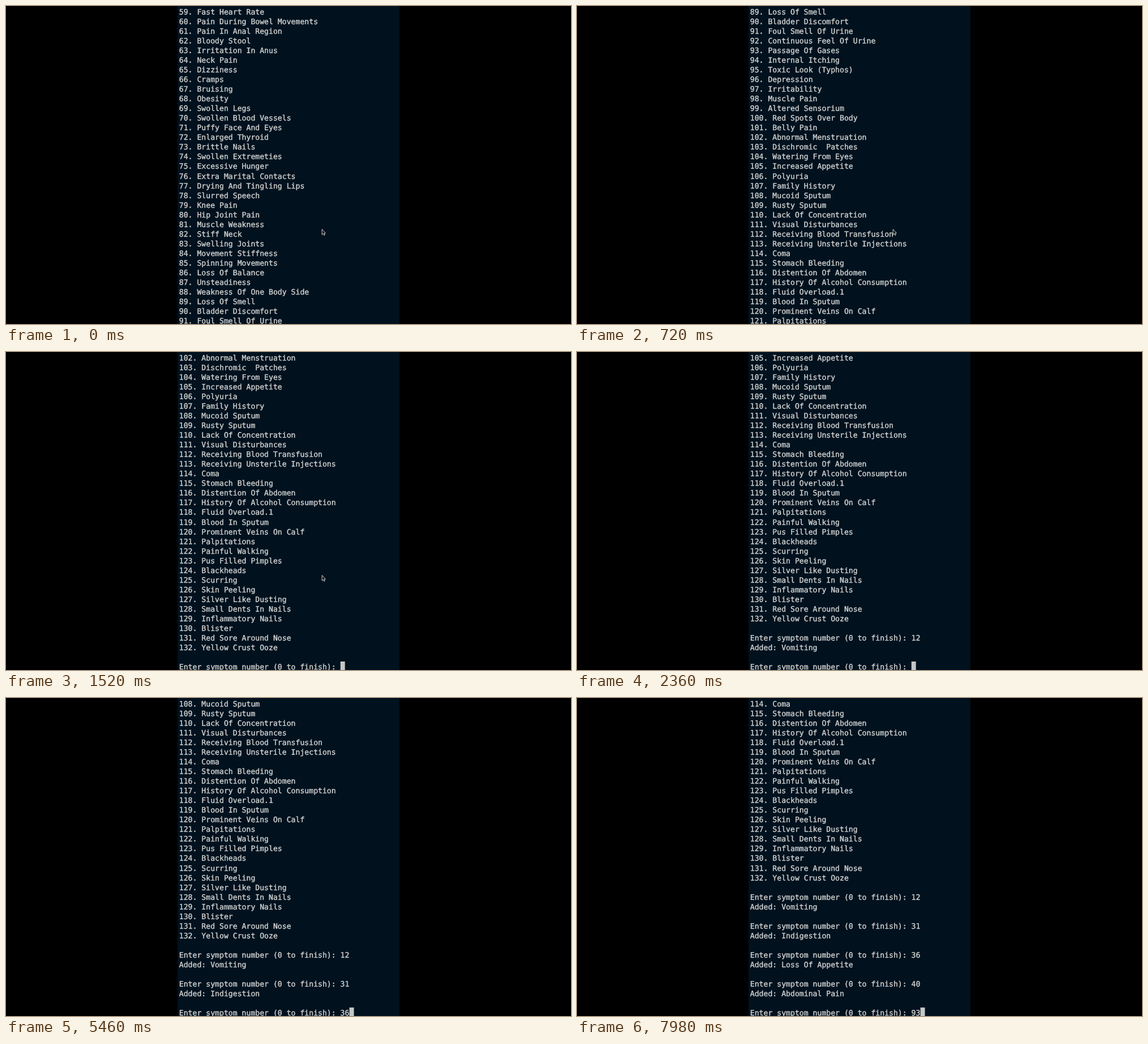
An HTML page that plays this animation: 998 px wide and 561 px high, repeating every 8000 ms.

```html
<!DOCTYPE html>
<html lang="en">
<head>
<meta charset="utf-8">
<title>Symptom checker terminal</title>
<style>
  html, body { margin: 0; width: 100%; height: 100%; overflow: hidden; background: #000; }
  svg { display: block; width: 100vw; height: 100vh; }
  text {
    font: 13.15px "DejaVu Sans Mono", "Liberation Mono", monospace;
    fill: #cfd1d0;
    stroke: #cfd1d0;
    stroke-width: .4px;
    white-space: pre;
    text-rendering: geometricPrecision;
  }
</style>
</head>
<body>
<svg viewBox="0 0 998 561">
  <rect width="998" height="561" fill="#000"/>
  <rect x="303" width="392" height="561" fill="#01111e"/>
  <g id="rows"></g>
  <rect id="caret" y="546" width="8" height="15" fill="#c4c6c6"/>
  <path id="mouse" d="M558.2 393.8v9.6l2.1-1.9 1.5 3.1 1.4-.7-1.4-3h2.6z"
    fill="#05090d" stroke="#d0d0d0" stroke-width="1" stroke-linejoin="round"/>
</svg>
<script>
const LOOP = 8000, ROWS = 33, PITCH = 17.03, LEFT = 306, CHAR = 7.917;
const FIRST = 59, LIST_END = 43;
const PROMPT = "Enter symptom number (0 to finish): ";

const symptoms = `Fast Heart Rate
Pain During Bowel Movements
Pain In Anal Region
Bloody Stool
Irritation In Anus
Neck Pain
Dizziness
Cramps
Bruising
Obesity
Swollen Legs
Swollen Blood Vessels
Puffy Face And Eyes
Enlarged Thyroid
Brittle Nails
Swollen Extremeties
Excessive Hunger
Extra Marital Contacts
Drying And Tingling Lips
Slurred Speech
Knee Pain
Hip Joint Pain
Muscle Weakness
Stiff Neck
Swelling Joints
Movement Stiffness
Spinning Movements
Loss Of Balance
Unsteadiness
Weakness Of One Body Side
Loss Of Smell
Bladder Discomfort
Foul Smell Of Urine
Continuous Feel Of Urine
Passage Of Gases
Internal Itching
Toxic Look (Typhos)
Depression
Irritability
Muscle Pain
Altered Sensorium
Red Spots Over Body
Belly Pain
Abnormal Menstruation
Dischromic  Patches
Watering From Eyes
Increased Appetite
Polyuria
Family History
Mucoid Sputum
Rusty Sputum
Lack Of Concentration
Visual Disturbances
Receiving Blood Transfusion
Receiving Unsterile Injections
Coma
Stomach Bleeding
Distention Of Abdomen
History Of Alcohol Consumption
Fluid Overload.1
Blood In Sputum
Prominent Veins On Calf
Palpitations
Painful Walking
Pus Filled Pimples
Blackheads
Scurring
Skin Peeling
Silver Like Dusting
Small Dents In Nails
Inflammatory Nails
Blister
Red Sore Around Nose
Yellow Crust Ooze`.split("\n").map((name, i) => `${FIRST + i}. ${name}`);

// Times of the first digit, the second digit and the Enter key
const entries = [
  { num: "12", name: "Vomiting", keys: [1780, 1960, 2200] },
  { num: "31", name: "Indigestion", keys: [2800, 3000, 3520] },
  { num: "36", name: "Loss Of Appetite", keys: [4480, 4680, 5580] },
  { num: "40", name: "Abdominal Pain", keys: [6120, 6320, 6980] },
  { num: "93", name: "Passage Of Gases", keys: [7620, 7800, Infinity] }
];

const $ = id => document.getElementById(id);
const rows = Array.from({ length: ROWS }, (_, i) => {
  const el = document.createElementNS("http://www.w3.org/2000/svg", "text");
  el.setAttribute("x", LEFT - 0.2);
  el.setAttribute("y", 15 + i * PITCH);
  return $("rows").appendChild(el);
});

// Trackpad scroll that slows down, with one short hold, until the list ends
function scrolled(t) {
  if (t > 720 && t < 820) t = 720;
  return Math.min(LIST_END, Math.round(70 * (1 - Math.exp(-t / 1286))));
}

function session(t) {
  const lines = [...symptoms, ""];
  let typed = "";
  for (const { num, name, keys } of entries) {
    typed = num.slice(0, keys.slice(0, 2).filter(k => t >= k).length);
    lines.push(PROMPT + typed);
    if (t < keys[2]) break;
    lines.push("Added: " + name, "");
  }
  return { lines, typed };
}

function draw(t) {
  const { lines, typed } = session(t);
  const top = scrolled(t);
  const atEnd = top === LIST_END;
  const start = atEnd ? lines.length - ROWS : top;
  rows.forEach((el, i) => {
    const line = lines[start + i] || "";
    if (el.textContent !== line) el.textContent = line;
  });
  $("caret").setAttribute("x", LEFT - 0.3 + CHAR * (PROMPT.length + typed.length));
  $("caret").style.display = atEnd ? "" : "none";
  $("mouse").style.display = t < entries[0].keys[0] ? "" : "none";
}

const begin = performance.now();
function tick() {
  draw((performance.now() - begin) % LOOP);
  requestAnimationFrame(tick);
}
tick();
</script>
</body>
</html>
```
